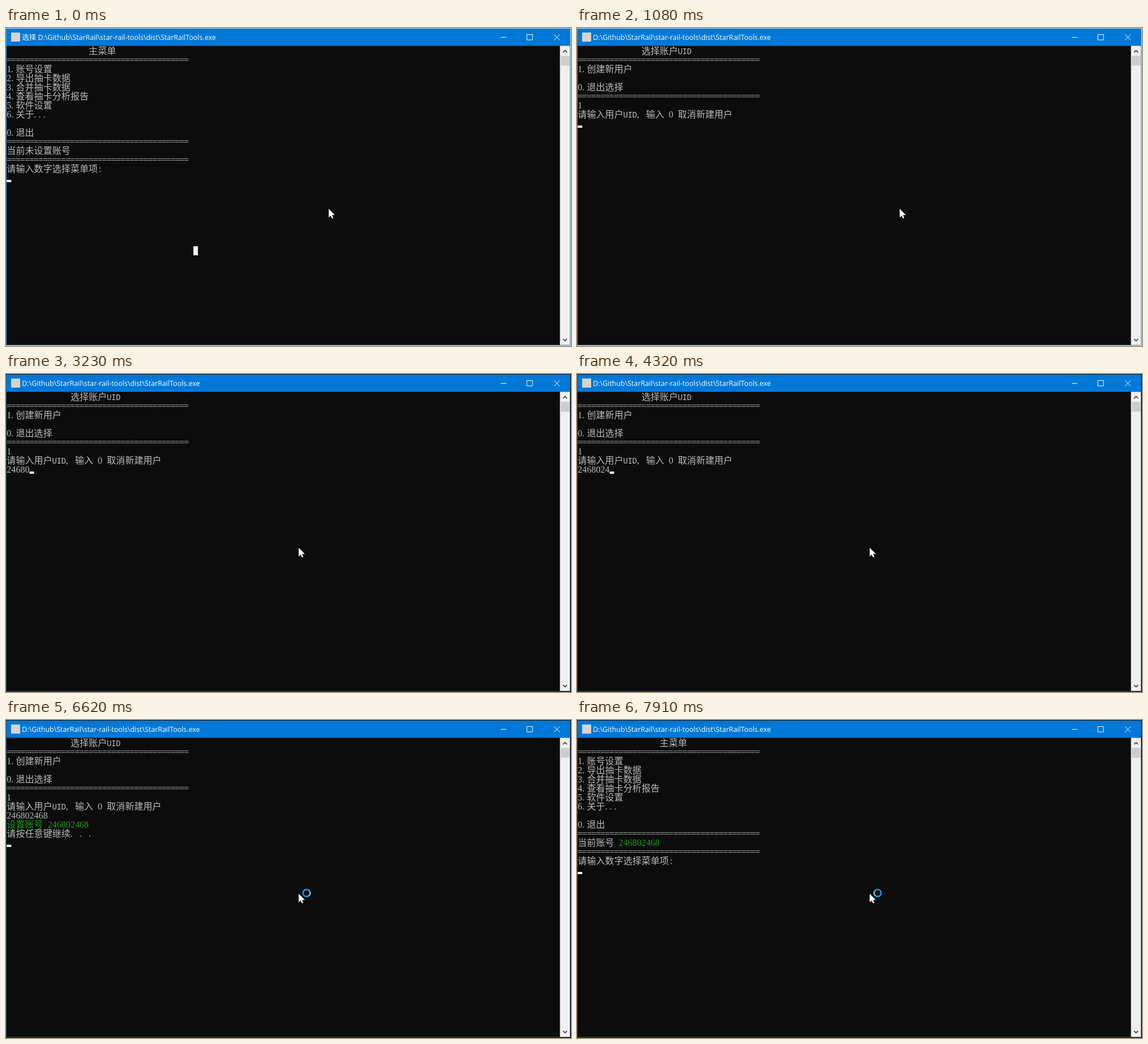
Write an HTML page with a canvas that moves like this. It is 998 px wide and 561 px high and loops after 7990 ms.

```html
<!DOCTYPE html>
<html lang="zh-CN">
<head>
<meta charset="utf-8">
<title>Console</title>
<style>
  html, body { margin: 0; width: 100%; height: 100%; overflow: hidden; background: #0c0c0c; }
  canvas { display: block; width: 998px; height: 561px; }
</style>
</head>
<body>
<canvas id="stage" width="998" height="561"></canvas>
<script>
const ctx = document.getElementById('stage').getContext('2d');
const LOOP = 7990, BLINK = 530;
const LEFT = 1.3, TOP = 32, COL = 8.04, ROW = 16;
const GREY = '#bcbcbc', GREEN = '#13a10e';
const CJK = '"Noto Sans CJK SC", "Noto Sans CJK", sans-serif';
const UID = '246802468', RULE = '='.repeat(40);
const PATH = 'D:\\Github\\StarRail\\star-rail-tools\\dist\\StarRailTools.exe';

// Screen texts; \x01 turns the rest of a line green
const mainMenu = account => [
  ' '.repeat(18) + '主菜单', RULE,
  '1.账号设置', '2.导出抽卡数据', '3.合并抽卡数据', '4.查看抽卡分析报告',
  '5.软件设置', '6.关于...', '', '0.退出',
  RULE, account, RULE, '请输入数字选择菜单项:'
];
const startMenu = mainMenu('当前未设置账号');
const userMenu = [' '.repeat(14) + '选择账户UID', RULE, '1.创建新用户', '', '0.退出选择', RULE];
const prompt = [...userMenu, '1', '请输入用户UID, 输入 0 取消新建用户'];
const result = [...prompt, UID, '\x01设置账号 ' + UID];
const paused = [...result, '请按任意键继续. . . '];
const cleared = rows => Array(rows).fill('');

// The text cursor stands at the end of the last line; firstOff is when it starts blinking
const stages = [
  { at: 0, lines: [...startMenu, ''] },
  { at: 120, lines: [...startMenu, '1'] },
  { at: 290, lines: [...startMenu, '1', ''] },
  { at: 330, lines: cleared(16) },
  { at: 380, lines: [...userMenu, ''], firstOff: 710 },
  { at: 880, lines: [...userMenu, '1'] },
  { at: 1080, lines: [...prompt, ''], firstOff: 1510, typing: true },
  { at: 5190, lines: [...result, ''] },
  { at: 5270, lines: paused, firstOff: 6220 },
  { at: 6380, lines: [...paused, ''] },
  { at: 6710, lines: cleared(12) },
  { at: 6760, lines: [...mainMenu('当前账号 \x01' + UID), ''], firstOff: 7230 }
];

// The digits come fast at both ends and slowly in the middle
function keyTime(i) {
  const u = i / (UID.length - 1), skew = 0.3;
  return 1990 + 2740 * (u - 0.0875 * (Math.sin(2 * Math.PI * u - skew) + Math.sin(skew)));
}

function screenAt(t) {
  const { at, lines, firstOff = Infinity, typing } = stages.findLast(s => s.at <= t);
  let shown = lines, since = at;
  if (typing) {
    let count = 0;
    while (count < UID.length && keyTime(count) <= t) since = keyTime(count++);
    if (count) shown = [...prompt, UID.slice(0, count)];
  }
  const ticks = time => Math.max(0, Math.floor((time - firstOff) / BLINK) + 1);
  const cursorOn = firstOff === Infinity || (ticks(t) - ticks(since)) % 2 === 0;
  return { lines: shown, cursorOn };
}

function rect(x, y, w, h, color) {
  ctx.fillStyle = color;
  ctx.fillRect(x, y, w, h);
}

function stroke(path, color, width) {
  ctx.strokeStyle = color;
  ctx.lineWidth = width;
  ctx.stroke(new Path2D(path));
}

// Draws one glyph per character cell and returns the end column
function drawLine(text, row) {
  let col = 0;
  ctx.fillStyle = GREY;
  for (const ch of text) {
    if (ch === '\x01') { ctx.fillStyle = GREEN; continue; }
    const cells = ch > '\u2e80' ? 2 : 1, x = LEFT + col * COL;
    const hugsLeft = ch === '.' || ch === ',';
    if (cells === 2) ctx.font = '300 16px ' + CJK;
    else if (/[A-Z]/.test(ch)) ctx.font = '14px "Liberation Mono", monospace';
    else ctx.font = '16px "Liberation Serif", serif';
    ctx.textAlign = hugsLeft ? 'left' : 'center';
    ctx.fillText(ch, hugsLeft ? x : x + cells * COL / 2, TOP + row * ROW + 14);
    col += cells;
  }
  return col;
}

function drawWindow(selecting, light) {
  rect(0, 0, 998, 561, light ? '#dcd8d4' : '#151515');
  rect(0, 1, 997, 559, light ? '#3c8fd2' : '#1f4f74');
  rect(1, 1, 995.5, 30.5, '#0078d7');
  rect(1, 31.5, 978, 527.5, '#0c0c0c');
  rect(978.5, 31.5, 17.5, 527.5, '#f0f0f0');
  rect(980, 49, 15.5, 17.5, '#cdcdcd');
  stroke('M984 43l3.5-3.5 3.5 3.5M984 548.5l3.5 3.5 3.5-3.5', '#505050', 1.8);

  rect(9, 8, 16, 16, '#d9d3ce');
  ctx.fillStyle = '#fff';
  ctx.textAlign = 'left';
  ctx.font = '12.45px "Open Sans", ' + CJK;
  ctx.fillText((selecting ? '选择 ' : '') + PATH, 28.3, 20.7);
  stroke('M874 16.5h10M920 11.5h10v9.5h-10zM968 11.5l10 10m0-10l-10 10', '#fff', 1);
}

function drawPointer(x, y) {
  ctx.fillStyle = '#fff';
  ctx.fill(new Path2D(`M${x} ${y}v15.2l3.4-3.2 2.6 5 2.2-1-2.3-5h4.9z`));
}

function drawSpinner(age) {
  const x = 531, y = 305.2, turn = Math.floor(age / 50) / 18;
  const ring = ctx.createConicGradient(turn * 2 * Math.PI, x, y);
  ring.addColorStop(0, '#1b8fe4');
  ring.addColorStop(0.6, '#1f9bee');
  ring.addColorStop(0.85, '#74d3fb');
  ring.addColorStop(1, '#1b8fe4');
  ctx.strokeStyle = ring;
  ctx.lineWidth = 2.5;
  ctx.beginPath();
  ctx.arc(x, y, 6.3, 0, 2 * Math.PI);
  ctx.stroke();
}

function frame() {
  const t = performance.now() % LOOP;
  const selecting = t < 80, moved = t >= 1580;
  drawWindow(selecting, !moved);

  const { lines, cursorOn } = screenAt(t);
  const col = lines.map(drawLine).at(-1);
  if (cursorOn) rect(LEFT + col * COL, TOP + lines.length * ROW - 4, 8, 4, '#f6f6f6');
  if (selecting) rect(331, 385, 8, 16, '#f2f2f2');

  drawPointer(moved ? 517 : 570, moved ? 306.5 : 319);
  if (t >= 6380) drawSpinner(t - 6380);
  requestAnimationFrame(frame);
}
frame();
</script>
</body>
</html>
```
